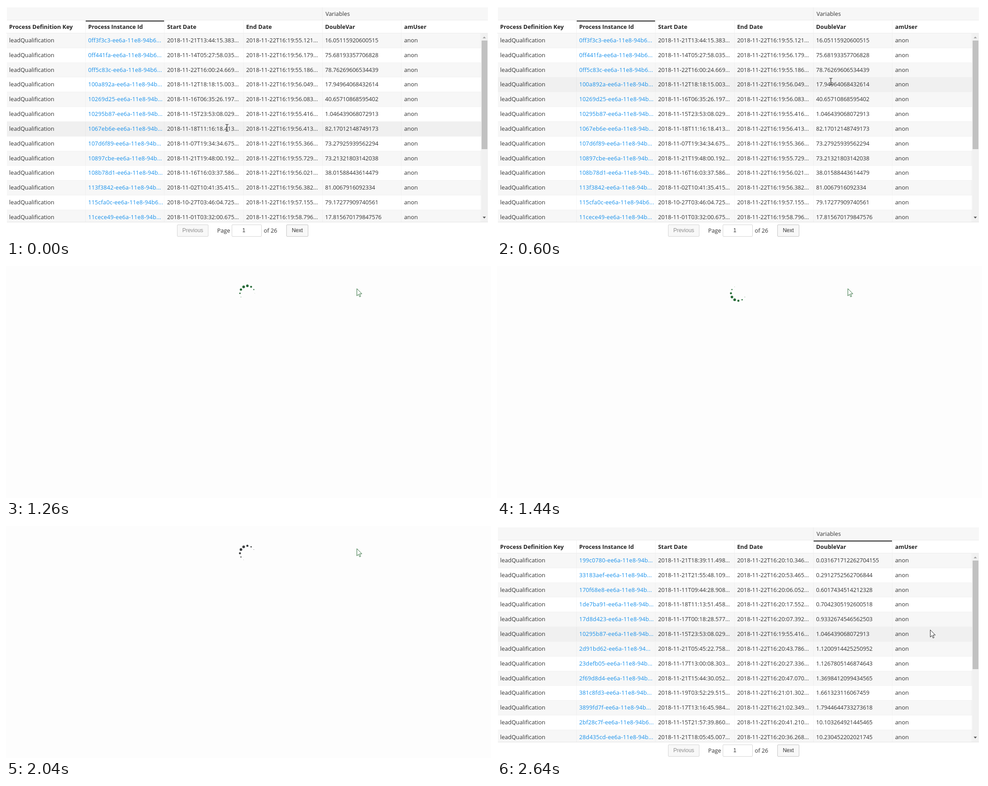
These frames come from a looping animation (1083x517 px, 3150 ms). An HTML page:

```html
<!DOCTYPE html>
<html lang="en">
<head>
<meta charset="utf-8">
<title>Sortable process table</title>
<style>
html, body { margin: 0; width: 100%; height: 100%; overflow: hidden; background: #fff; }
#stage { position: relative; width: 1083px; height: 517px; overflow: hidden;
  font: 12.8px "Open Sans", "Noto Sans", sans-serif; color: #333; }
#stage div, #stage svg { position: absolute; box-sizing: border-box; white-space: pre; }
#groups { left: 2px; top: 3px; width: 1074px; height: 29px; background: #f7f7f7; border-bottom: 1px solid #ececec; }
#groups div { left: 704px; top: 0; height: 28px; padding-left: 6.4px; line-height: 28px; border-left: 1px solid #ececec; }
#head { left: 0; top: 32px; width: 1076px; height: 29px; border-bottom: 1px solid #ececec; }
#head div { top: 0; height: 28px; line-height: 28px; padding-left: 5.5px; font-weight: 700; color: #222; }
#head .cell { border-right: 1px solid #f2f2f2; }
#head .sorted { box-shadow: inset 0 3px 0 #666; }
.body { left: 0; top: 61px; width: 1061px; height: 420px; overflow: hidden; }
.row { left: 2px; width: 1059px; height: 32.8px; border-bottom: 1px solid #f2f2f2; }
.row.odd { background: #f7f7f7; }
.row.hover { background: #f0f0f0; }
.row .cell { height: 31.8px; line-height: 31.8px; padding-left: 5.5px; border-right: 1px solid rgba(0,0,0,.03); }
.row .link { color: #1991eb; letter-spacing: .17px; }
.row .number { letter-spacing: -.1px; }
#bar { left: 1061px; top: 61px; width: 15px; height: 420px; background: #f1f1f1; }
#thumb { left: 1px; top: 16px; width: 13px; height: 242px; background: #c1c1c1; }
#foot { left: 2px; top: 481px; width: 1074px; height: 1px; background: #e2e2e2; }
.box { top: 487px; height: 27px; line-height: 25px; text-align: center; border: 1px solid #c4c4c4; border-radius: 2px;
  font-family: "Liberation Sans", Arial, sans-serif; font-size: 12px; background: #f8f8f8; }
.label { top: 487px; line-height: 27px; }
#loader { inset: 0; background: #fdfdfd; }
#cursor { left: 0; top: 0; width: 1083px; height: 517px; }
</style>
</head>
<body>
<div id="stage"></div>
<script>
const LOOP = 3150, TICK = 30;
const LOAD_START = 1140, LOAD_END = 2070;
const SPIN_ORIGIN = 1170, SPIN_PERIOD = 265;
const ROW_TOP = 61, ROW_PITCH = 32.83;
const COL_LEFT = 1.5, COL_WIDTH = 176.4;
const TEXT_WIDTHS = [100, 165, 160, 160, 120, 34];
const CELL_CLASSES = ["cell", "cell link", "cell", "cell", "cell number", "cell"];
const HEADERS = ["Process Definition Key", "Process Instance Id", "Start Date", "End Date", "DoubleVar", "amUser"];

// id start, id tail, start date, end time, value
const BY_ID = `0ff3f3c3 94b6 11-21T13:44:15.383 19:55.121 16.05115920600515
0ff441fa 94b6 11-14T05:27:58.035 19:56.179 75.68193357706828
0ff5c83c 94b6 11-22T16:00:24.669 19:55.186 78.76269606534439
100a892a 94b 11-12T18:18:15.003 19:56.049 17.94964068432614
10269d25 94b 11-16T06:35:26.197 19:56.083 40.65710868595402
10295b87 94b 11-15T23:53:08.029 19:55.416 1.046439068072913
1067eb6e 94b 11-18T11:16:18.413 19:56.413 82.17012148749173
107d6f89 94b 11-07T19:34:34.675 19:55.366 73.27925939562294
10897cbe 94b 11-21T19:48:00.192 19:55.729 73.21321803142038
108b78d1 94b 11-16T16:03:37.586 19:56.021 38.01588443614479
113f3842 94b 11-02T10:41:35.415 19:56.382 81.0067916092334
115cfa0c 94b6 10-27T03:46:04.725 19:57.155 79.17277909740561
11cece49 94b 11-01T03:32:00.675 19:58.796 17.815670179847576`;

const BY_VALUE = `199c0780 94b 11-21T18:39:11.498 20:10.346 0.031671712262704155
33183aef 94b 11-21T21:55:48.109 20:53.465 0.2912752562706844
170f68e8 94b 11-11T09:44:28.908 20:06.052 0.6017434514212328
1de7ba91 94b 11-18T11:13:51.458 20:17.552 0.7042305192600518
17d8d423 94b 11-17T00:18:28.577 20:07.392 0.9332674546562503
10295b87 94b 11-15T23:53:08.029 19:55.416 1.046439068072913
2d91bd62 94 11-21T05:45:22.758 20:43.786 1.1200914425250952
23defb05 94b 11-17T13:00:08.303 20:27.336 1.1267805146874643
2f69d8d4 94b 11-21T15:44:30.052 20:47.070 1.3698412099434565
381c8fd3 94b 11-19T03:52:29.515 21:01.302 1.661323116067459
3899fd7f 94b 11-17T13:16:45.984 21:02.349 1.7944644733273618
2bf28c7f 94b6 11-15T21:57:39.860 20:41.210 10.103264921445465
28d435cd 94b 11-21T18:05:45.007 20:36.268 10.230452202021745`;

const stage = document.getElementById("stage");

function div(parent, props = {}, style = {}) {
  const el = Object.assign(document.createElement("div"), props);
  Object.assign(el.style, style);
  return parent.appendChild(el);
}

function svg(parent, tag, attrs) {
  const el = document.createElementNS("http://www.w3.org/2000/svg", tag);
  for (const name in attrs) el.setAttribute(name, attrs[name]);
  return parent.appendChild(el);
}

const px = n => n + "px";

function cell(parent, col, text, className, origin = 0, width = COL_WIDTH) {
  return div(parent, { textContent: text, className },
    { left: px(COL_LEFT + col * COL_WIDTH - origin), width: px(width) });
}

function makeBody(data) {
  const body = div(stage, { className: "body" });
  const rows = data.split("\n").map((line, i) => {
    const [id, tail, start, end, value] = line.split(" ");
    const row = div(body, { className: i % 2 ? "row" : "row odd" }, { top: px(i * ROW_PITCH) });
    const texts = ["leadQualification", `${id}-ee6a-11e8-${tail}...`, `2018-${start}...`,
      `2018-11-22T16:${end}...`, value, "anon"];
    texts.forEach((text, col) => cell(row, col, text, CELL_CLASSES[col], 2));
    return row;
  });
  return { body, rows };
}

div(div(stage, { id: "groups" }), { textContent: "Variables" });
const head = div(stage, { id: "head" });
const heads = HEADERS.map((text, col) =>
  cell(head, col, text, col < 5 ? "cell" : "", 0, col < 5 ? COL_WIDTH : 192));
const before = makeBody(BY_ID), after = makeBody(BY_VALUE);

const bar = div(stage, { id: "bar" });
div(bar, { id: "thumb" });
const arrows = svg(bar, "svg", { width: 15, height: 420 });
svg(arrows, "path", { d: "M3.5 11l3.5-4 3.5 4z", fill: "#a3a3a3" });
svg(arrows, "path", { d: "M3.5 408.5l3.5 4 3.5-4z", fill: "#505050" });

div(stage, { id: "foot" });
function box(text, left, width, style) {
  div(stage, { className: "box", textContent: text }, { left: px(left), width: px(width), ...style });
}
box("Previous", 382, 70, { color: "#8c8c8c", borderColor: "#d4d4d4" });
box("1", 504, 67, { background: "#fff", paddingRight: "13px", borderColor: "#d4d4d4" });
box("Next", 626, 49);
div(stage, { className: "label", textContent: "Page" }, { left: "471.5px" });
div(stage, { className: "label", textContent: "of 26" }, { left: "575.5px" });

const loader = div(stage, { id: "loader" });
const ring = svg(loader, "svg", { width: 1083, height: 517 });
const dots = Array.from({ length: 12 }, (_, k) => {
  const a = k * Math.PI / 6;
  return svg(ring, "circle", { cx: 539 + 16.6 * Math.sin(a), cy: 60.8 - 16.6 * Math.cos(a) });
});

const layer = svg(stage, "svg", { id: "cursor" });
const outline = { fill: "#fff", stroke: "#222", "stroke-width": 1, "stroke-linejoin": "round" };
const cursors = {
  beam: svg(layer, "path", { d: "M-3.5-7.5h2.5l1 1 1-1h2.5M0-6.5v13M-3.5 7.5h2.5l1-1 1 1h2.5",
    fill: "none", stroke: "#222", "stroke-width": 1.1 }),
  arrow: svg(layer, "path", { ...outline,
    d: "M0 0V16L3.7 12.6 6.2 18.2 8.5 17.2 6.1 11.5H11.2Z" }),
  hand: svg(layer, "path", { ...outline, "stroke-width": 1.2,
    d: "M-1.5 1a1.5 1.5 0 0 1 3 0V6.5c0-1.4 3-1.4 3 .3V7.5c0-1.4 3-1.2 3 .4V8.8c0-1.2 2.3-1 2.3.6V14" +
       "c0 2-1.5 3-1.5 5V21H-1.5V19C-2 17-5 14-6 11.5C-6.5 9.8-4.5 9-3.2 10.5L-1.5 12.5Z" })
};

const ease = {
  inOut: u => (1 - Math.cos(Math.PI * u)) / 2,
  linear: u => u,
  out: u => Math.sin(Math.PI * u / 2)
};

// time, x, y, easing towards this point, bend of the way (above 1: sideways first)
const PATH = [
  [90, 493, 271],
  [600, 745, 168, "inOut", 1.6],
  [990, 783, 50, "inOut", 1],
  [2220, 783, 50, "linear", 1],
  [2310, 815, 98, "linear", 1],
  [2640, 967, 231, "out", 1]
];

function pointer(t) {
  const i = PATH.findIndex(p => p[0] > t);
  if (i === 0) return PATH[0].slice(1, 3);
  if (i < 0) return PATH[PATH.length - 1].slice(1, 3);
  const [t0, x0, y0] = PATH[i - 1], [t1, x1, y1, kind, bend] = PATH[i];
  const u = ease[kind]((t - t0) / (t1 - t0));
  return [x0 + (x1 - x0) * u, y0 + (y1 - y0) * u ** bend];
}

function cursorKind(x, y, loading) {
  if (loading) return "arrow";
  if (y < ROW_TOP) return "hand";
  const col = Math.floor((x - COL_LEFT) / COL_WIDTH);
  const dx = x - COL_LEFT - col * COL_WIDTH - 5.5;
  const dy = (y - ROW_TOP) % ROW_PITCH - 15.9;
  const onText = dx >= 0 && dx <= TEXT_WIDTHS[col] && Math.abs(dy) <= 9;
  return onText ? (col === 1 ? "hand" : "beam") : "arrow";
}

function drawSpinner(t) {
  const turn = (t - SPIN_ORIGIN) / SPIN_PERIOD;
  ring.setAttribute("fill", t < 1700 ? "#256a37" : "#3a3d3f");
  dots.forEach((dot, k) => {
    const phase = (turn + 2 - k / 12) % 1;
    const u = Math.max(0, 1 - Math.abs(phase - 0.4) / 0.4);
    dot.setAttribute("r", 3 * ease.inOut(u));
  });
}

function draw(t) {
  const loading = t >= LOAD_START && t < LOAD_END;
  const sorted = t >= LOAD_START;
  const [x, y] = pointer(t);
  loader.style.display = loading ? "" : "none";
  if (loading) drawSpinner(t);

  before.body.style.display = sorted ? "none" : "";
  after.body.style.display = sorted ? "" : "none";
  heads[1].classList.toggle("sorted", !sorted);
  heads[4].classList.toggle("sorted", sorted);
  const over = Math.floor((y - ROW_TOP) / ROW_PITCH);
  (sorted ? after : before).rows.forEach((row, i) => row.classList.toggle("hover", i === over));

  const kind = cursorKind(x, y, loading);
  for (const name in cursors) cursors[name].style.display = name === kind ? "" : "none";
  cursors[kind].setAttribute("transform", `translate(${Math.round(x) + 0.5} ${Math.round(y) + 0.5})`);
  cursors.arrow.setAttribute("stroke", loading ? "#2a6a38" : "#222");
}

const began = performance.now();
function frame() {
  const t = (performance.now() - began) % LOOP;
  draw(Math.floor(t / TICK) * TICK);
  requestAnimationFrame(frame);
}
frame();
</script>
</body>
</html>
```
